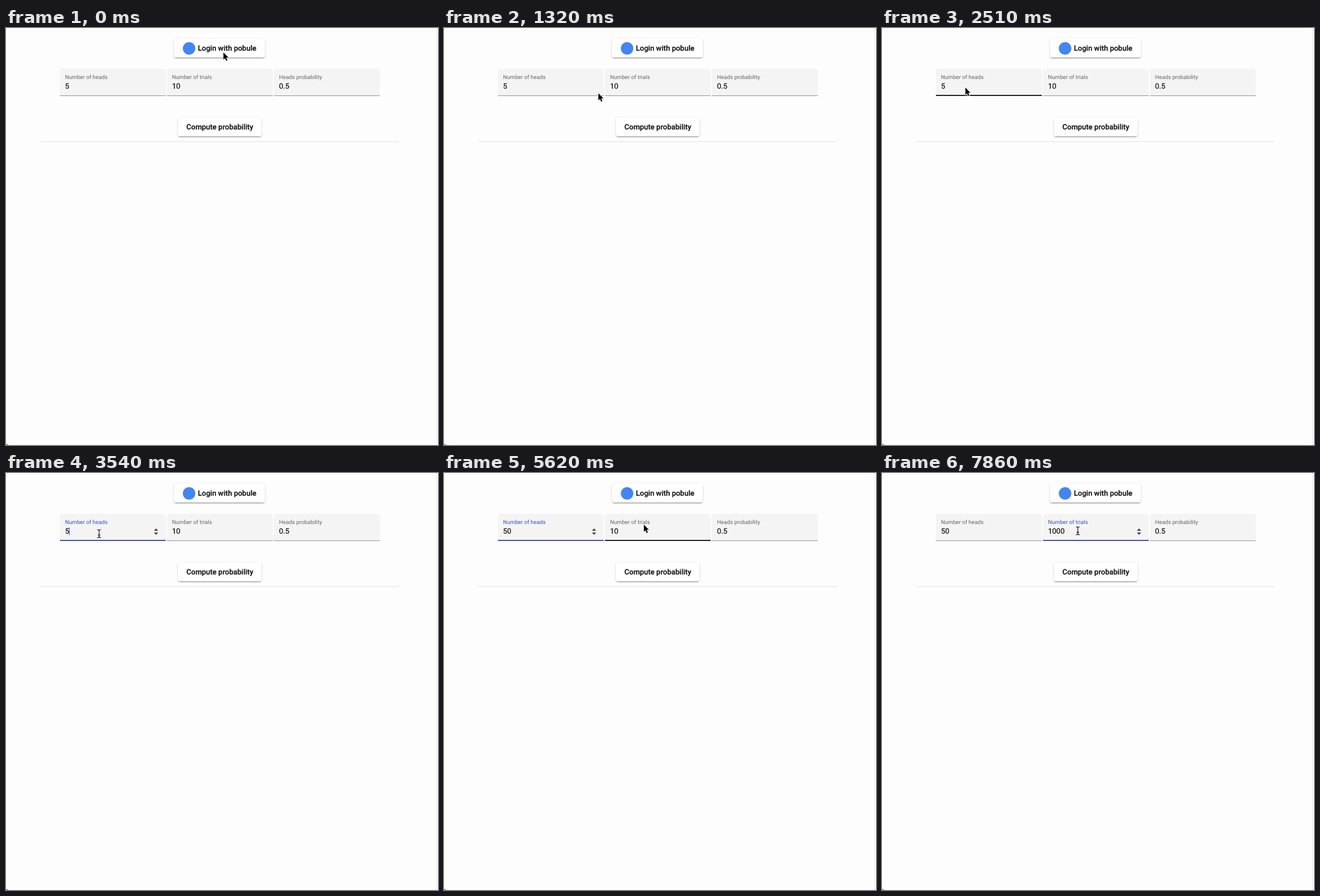
An HTML page that plays this animation: 761 px wide and 736 px high, repeating every 8000 ms.

```html
<!DOCTYPE html>
<html lang="en">
<head>
<meta charset="utf-8">
<title>Probability form</title>
<style>
  html, body { margin: 0; width: 100%; height: 100%; overflow: hidden; background: #fdfdfd; }
  .button {
    position: absolute; height: 33px; border-radius: 4px; background: #fff;
    box-shadow: 0 3px 1px -2px rgba(0,0,0,.2), 0 2px 2px rgba(0,0,0,.14), 0 1px 4px rgba(0,0,0,.12);
  }
  svg { position: absolute; left: 0; top: 0; font: 13px Roboto, sans-serif; text-rendering: geometricPrecision; }
  .caption, .value { fill: #141414; stroke: #141414; stroke-width: .25; }
  .caption { font-weight: 500; }
  .label { font-size: 9.75px; }
  #arrow { stroke: #fff; stroke-width: 1.8; stroke-linejoin: round; paint-order: stroke; }
  #beam { fill: none; stroke-linecap: round; }
</style>
</head>
<body>
<div class="button" style="left:296px;top:19px;width:160px"></div>
<div class="button" style="left:303px;top:157.5px;width:147px"></div>
<svg width="761" height="736">
  <circle cx="322.5" cy="36" r="11" fill="#4285f4"/>
  <text class="caption" x="338" y="40">Login with pobule</text>
  <text class="caption" x="317.8" y="178.5">Compute probability</text>
  <path d="M60 200.5H692" stroke="#e0e0e0"/>
  <path d="M758.5 0V736" stroke="#e6e6e6"/>
  <path d="M0 735H3L4 736H0Z" fill="#444"/>
  <g id="fields"></g>
  <rect id="caret" y="96" width="1" height="14" fill="#3f51b5"/>
  <path id="arrow" d="M0 0V12.8L2.8 10.2 4.9 14.9 7.1 14 5 9.3H9Z"/>
  <g id="beam">
    <path id="beamShape" stroke="#fff" stroke-width="2.6" d="M-3-7Q0-7 0-5Q0-7 3-7M0-5V5M-3 7Q0 7 0 5Q0 7 3 7M-2 2.5H2"/>
    <path stroke="#000" stroke-width="1.2" d="M-3-7Q0-7 0-5Q0-7 3-7M0-5V5M-3 7Q0 7 0 5Q0 7 3 7M-2 2.5H2"/>
  </g>
</svg>
<script>
const LOOP = 8000, FRAME = 147.1, BLINK = 500, DIGIT = 7.3, FIELD_WIDTH = 186.5;
const WINDOW_ACTIVE = 2100; // fields react to the pointer from here on
const BLUE = '#3f51b5';
const byId = id => document.getElementById(id);

const fields = [
  { x: 95, label: 'Number of heads', text: '5', focusAt: 2520, blurAt: 5950, zerosAt: [4680] },
  { x: 283.5, label: 'Number of trials', text: '10', focusAt: 5950, blurAt: LOOP, zerosAt: [7150, 7280] },
  { x: 472, label: 'Heads probability', text: '0.5', focusAt: LOOP, blurAt: LOOP, zerosAt: [] }
];

// Pointer stops: time, x, y
const stops = [
  [0, 383, 43], [740, 336, 101], [1170, 272, 115], [1470, 234, 103], [1620, 234, 103],
  [2060, 46, 94], [2640, 164, 107], [4000, 164, 107], [4110, 164, 104], [5180, 164, 104],
  [5590, 352, 91], [5900, 345, 102], [LOOP, 345, 102]
];

function pointerAt(t) {
  const next = stops.findIndex(stop => stop[0] > t);
  const [t0, x0, y0] = stops[next - 1], [t1, x1, y1] = stops[next];
  const p = (t - t0) / (t1 - t0), ease = p * p * (3 - 2 * p);
  return [x0 + (x1 - x0) * ease, y0 + (y1 - y0) * ease];
}

for (const field of fields) {
  const g = document.createElementNS('http://www.w3.org/2000/svg', 'g');
  g.setAttribute('transform', `translate(${field.x})`);
  g.innerHTML = `
    <path d="M0 120V76Q0 72 4 72H182.5Q186.5 72 186.5 76V120Z" fill="#f4f4f4"/>
    <rect class="line" width="${FIELD_WIDTH}"/>
    <text class="label" x="9" y="90">${field.label}</text>
    <text class="value" x="9" y="107"></text>
    <path class="spinner" d="M165.5 102L169.3 97.8 173.1 102ZM165.5 105L169.3 109.2 173.1 105Z" fill="#4a4a4a"/>`;
  byId('fields').append(g);
  for (const part of ['line', 'label', 'value', 'spinner'])
    field[part + 'Node'] = g.querySelector('.' + part);
}

const show = (node, visible) => node.style.display = visible ? '' : 'none';

function draw(now) {
  const t = Math.floor(now % LOOP / FRAME) * FRAME;
  const [x, y] = pointerAt(t);
  let overInput = false, caretVisible = false;

  for (const field of fields) {
    const typed = field.zerosAt.filter(time => time <= t);
    const value = field.text + '0'.repeat(typed.length);
    const focused = t >= field.focusAt && t < field.blurAt;
    const inside = x > field.x && x < field.x + FIELD_WIDTH && y > 72 && y < 120;
    const thick = focused || inside && t > WINDOW_ACTIVE;

    field.valueNode.textContent = value;
    field.labelNode.setAttribute('fill', focused ? BLUE : '#666');
    field.lineNode.setAttribute('fill', focused ? BLUE : thick ? '#202020' : '#909090');
    field.lineNode.setAttribute('y', thick ? 118 : 119);
    field.lineNode.setAttribute('height', thick ? 2 : 1);
    show(field.spinnerNode, focused);

    if (focused) {
      const blinkStart = Math.max(field.focusAt, ...typed);
      caretVisible = Math.floor((t - blinkStart) / BLINK) % 2 === 0;
      byId('caret').setAttribute('x', Math.floor(field.x + 9 + DIGIT * value.length));
      overInput = inside;
    }
  }

  show(byId('caret'), caretVisible);
  show(byId('beam'), overInput);
  show(byId('arrow'), !overInput);
  for (const id of ['arrow', 'beam'])
    byId(id).setAttribute('transform', `translate(${x} ${y})`);
  requestAnimationFrame(draw);
}
requestAnimationFrame(draw);
</script>
</body>
</html>
```
